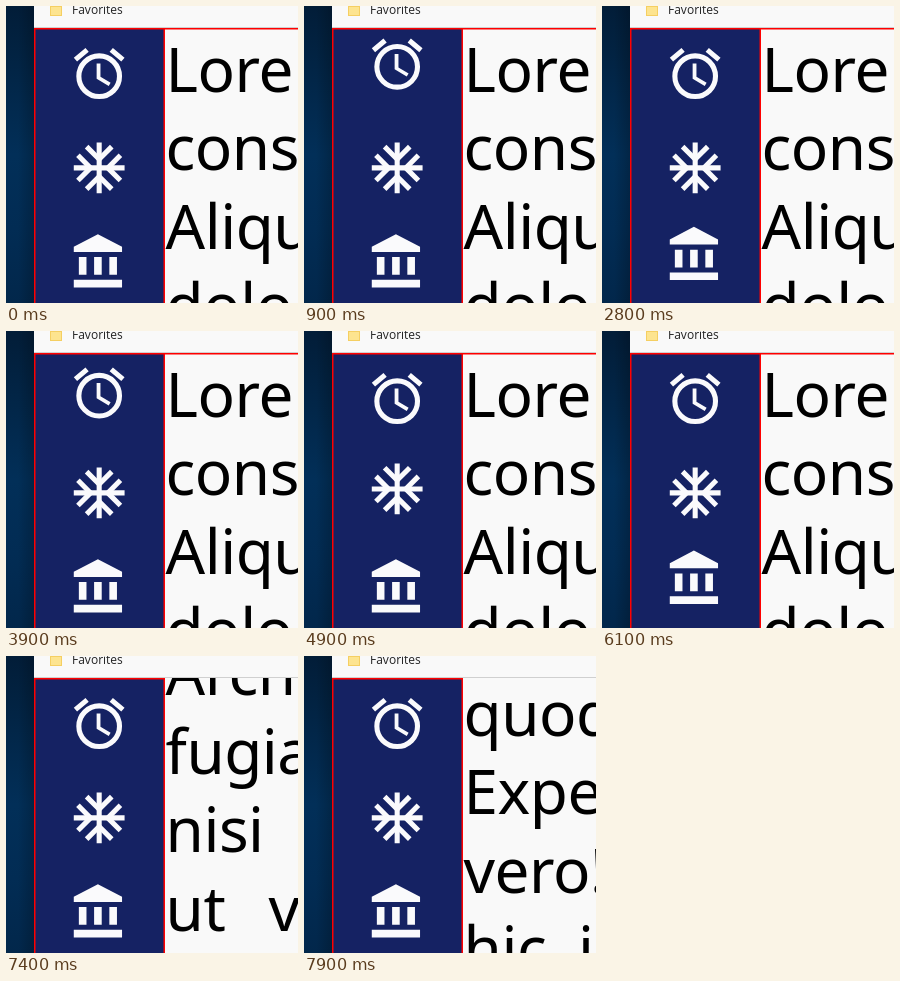
Recreate the animation shown at these times as an HTML page. Size 292 by 297 pixels, loop 8000 ms.

```html
<!DOCTYPE html>
<html lang="en">
<head>
<meta charset="utf-8">
<style>
  html, body { margin: 0; width: 100%; height: 100%; overflow: hidden; }
  svg { display: block; }
  .bookmark { font: 12px "Open Sans", "Noto Sans", sans-serif; fill: #222; }
  .copy { font: 62px "Noto Sans", "Open Sans", sans-serif; letter-spacing: -.5px; fill: #000; }
  .icon { fill: #fafafc; stroke: none; }
  .icon .line { fill: none; stroke: #fafafc; stroke-width: 2; }
</style>
</head>
<body>
<svg width="292" height="297" viewBox="0 0 292 297">
  <defs>
    <linearGradient id="wall" x2="0" y2="1">
      <stop offset="0" stop-color="#021d38"/>
      <stop offset=".5" stop-color="#022f58"/>
      <stop offset=".75" stop-color="#022c54"/>
      <stop offset="1" stop-color="#02274b"/>
    </linearGradient>
    <linearGradient id="shade">
      <stop offset="0" stop-color="#000" stop-opacity="0"/>
      <stop offset="1" stop-color="#000" stop-opacity=".2"/>
    </linearGradient>
    <clipPath id="pane"><path d="M159 22H292V297H159z"/></clipPath>
    <path id="chevron" d="M20.36 7.05 15.41 12l4.95 4.95"/>
  </defs>

  <rect width="28" height="297" fill="url(#wall)"/>
  <rect x="12" width="16" height="297" fill="url(#shade)"/>

  <!-- browser toolbar -->
  <rect x="28" width="264" height="22" fill="#f9f9f9"/>
  <rect x="28" y="21" width="264" height="1" fill="#d0d0d0"/>
  <path d="M44-3h5l1 2h6V10H44z" fill="#f5cf62"/>
  <path d="M45 1h10v8H45z" fill="#fde48f"/>
  <text class="bookmark" x="66" y="8">Favorites</text>

  <!-- scrolling text -->
  <rect x="159" y="22" width="133" height="275" fill="#f9f9f9"/>
  <g clip-path="url(#pane)">
    <g id="copy" class="copy">
      <rect x="159" y="22" width="133" height="1.5" fill="#f00"/>
    </g>
  </g>

  <!-- sidebar -->
  <rect x="28" y="22" width="131" height="290" fill="#152263"/>
  <path d="M28.75 297V22.75H158.25V297" fill="none" stroke="#f00" stroke-width="1.5"/>
  <g class="icon">
    <g class="line">
      <circle cx="12" cy="13" r="8"/>
      <path d="M2.65 6.48 7.24 2.63M21.35 6.48 16.75 2.63"/>
    </g>
    <path d="M12.5 8H11v6l4.75 2.85.75-1.23-4-2.37z"/>
  </g>
  <g class="icon">
    <g class="line">
      <path d="M2 12H22M12 2V22"/>
      <use href="#chevron"/>
      <use href="#chevron" transform="rotate(90 12 12)"/>
      <use href="#chevron" transform="rotate(180 12 12)"/>
      <use href="#chevron" transform="rotate(270 12 12)"/>
    </g>
  </g>
  <g class="icon">
    <path d="M11.5 1 2 6v2h19V6zM4 10h3v7H4zM10 10h3v7h-3zM16 10h3v7h-3zM2 19h19v3H2z"/>
  </g>
</svg>

<script>
const LOOP = 8000, STEP = 100, LIFT = 10, MOVE = 500, LINE_HEIGHT = 78.6;
const copy = document.getElementById('copy');
const icons = document.querySelectorAll('.icon');

// Per icon: start of each [rise, fall] pair
const hovers = [
  [[550, 1050], [3740, 4300]],
  [[1550, 2140], [4778, 5300]],
  [[2580, 3140], [5820, 6430]]
];
// Scrolls: start, end, distance
const scrolls = [[7100, 7400, 361], [7500, 7900, 274]];

const lines = ['Lorem', 'consectetur', 'Aliquam', 'dolores', 'Architecto', 'fugiat',
  'nisi', 'ut|voluptas', 'quod', 'Expedita', 'vero!', 'hic, ipsa'];
lines.forEach((line, row) => line.split('|').forEach((word, column) => {
  const text = document.createElementNS('http://www.w3.org/2000/svg', 'text');
  text.setAttribute('x', 159.6 + column * 103);
  text.setAttribute('y', 85.8 + row * LINE_HEIGHT);
  text.textContent = word;
  copy.append(text);
}));

const progress = (t, start, end) => Math.min(1, Math.max(0, (t - start) / (end - start)));
const smooth = p => p * p * (3 - 2 * p);

// CSS "ease": cubic-bezier(.25, .1, .25, 1)
function ease(x) {
  const bezier = (s, a, b) => 3 * s * (1 - s) ** 2 * a + 3 * s * s * (1 - s) * b + s ** 3;
  let low = 0, high = 1;
  for (let i = 0; i < 24; i++) {
    const mid = (low + high) / 2;
    if (bezier(mid, .25, .25) < x) low = mid; else high = mid;
  }
  return bezier(high, .1, 1);
}

function draw(time) {
  const t = Math.floor(time % LOOP / STEP) * STEP;
  const shift = start => ease(progress(t, start, start + MOVE));
  icons.forEach((icon, i) => {
    const raised = hovers[i].reduce((sum, [rise, fall]) => sum + shift(rise) - shift(fall), 0);
    const y = 37.2 + 94.2 * i - LIFT * raised;
    icon.setAttribute('transform', `translate(62.7 ${y}) scale(2.54)`);
  });
  const scrolled = scrolls.reduce((sum, [start, end, distance]) =>
    sum + distance * smooth(progress(t, start, end)), 0);
  copy.setAttribute('transform', `translate(0 ${-scrolled})`);
}

const began = performance.now();
function tick() {
  draw(performance.now() - began);
  requestAnimationFrame(tick);
}
tick();
</script>
</body>
</html>
```
